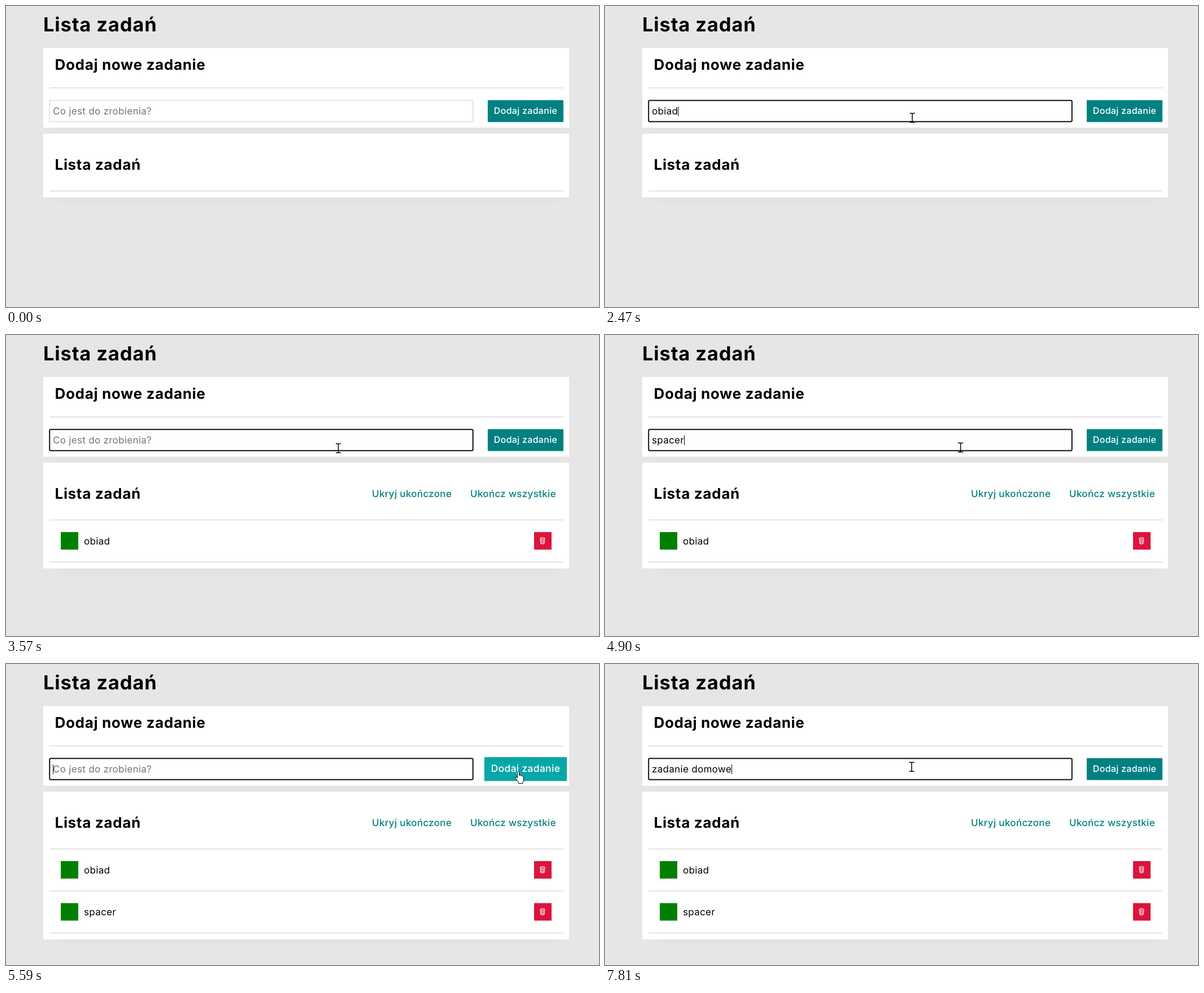
An HTML page that plays this animation: 1050x533 px, repeating every 8 s.

```html
<!DOCTYPE html>
<html lang="pl">
<head>
<meta charset="utf-8">
<title>Lista zadań</title>
<style>
  html, body { margin: 0; width: 100%; height: 100%; overflow: hidden; background: #e6e6e6; }
  svg { display: block; font: 500 17px Montserrat, Inter, sans-serif; }
  text { white-space: pre; text-rendering: geometricPrecision; letter-spacing: .018em; }
  .title, .heading { font-weight: 700; letter-spacing: .026em; }
  .title { font-size: 34.4px; }
  .heading { font-size: 26px; }
  .label { font-size: 16px; fill: #fff; text-anchor: middle; }
  .plain { font-weight: 400; }
  .card { fill: #fff; }
  .shadow { opacity: .02; filter: blur(7px); }
  .rule { fill: #e4e4e4; }
  .link { fill: teal; }
  .trash { fill: none; stroke: #fff; }
</style>
</head>
<body>
<svg width="1050" height="533" viewBox="0 0 1050 533">
  <defs>
    <g id="row">
      <rect x="97" y="349" width="31" height="31" fill="green"/>
      <rect x="935" y="349" width="31" height="31" fill="crimson"/>
      <g class="trash">
        <ellipse cx="950" cy="360" rx="4" ry="1.4"/>
        <path d="M946 360l.9 9.3q3.1 1.8 6.2 0l.9-9.3"/>
        <path stroke-width=".7" d="M948.5 362l.3 8M951.5 362l-.3 8M946.4 364h7.2M946.7 367h6.6"/>
      </g>
      <rect class="rule" x="77" y="401" width="910" height="2"/>
    </g>
  </defs>

  <text class="title" x="66" y="45">Lista zadań</text>
  <rect class="shadow" x="90" y="90" width="890" height="132"/>
  <rect class="shadow" id="listShadow" x="90" y="242" width="890"/>
  <rect class="card" x="66" y="74.5" width="931" height="141"/>
  <rect class="card" id="list" x="66" y="226" width="931"/>

  <text class="heading" x="86.5" y="113">Dodaj nowe zadanie</text>
  <rect class="rule" x="77" y="144" width="910" height="2"/>
  <rect id="field" x="77.2" y="167.2" width="749.6" height="37.6" fill="#fff"/>
  <text class="plain" id="entry" x="83" y="192"></text>
  <rect id="caret" y="178" width="1" height="17"/>
  <g id="button">
    <rect id="buttonBack" x="853" y="166.7" width="134" height="38.8"/>
    <text class="label" x="920" y="191">Dodaj zadanie</text>
  </g>

  <text class="heading" x="86.5" y="290">Lista zadań</text>
  <rect class="rule" x="77" y="326.5" width="910" height="2"/>
  <g id="first">
    <text class="link" x="648" y="287">Ukryj ukończone</text>
    <text class="link" x="822" y="287">Ukończ wszystkie</text>
    <use href="#row"/>
    <text class="plain" x="138" y="370.5">obiad</text>
  </g>
  <g id="second">
    <use href="#row" y="74.4"/>
    <text class="plain" x="138" y="445">spacer</text>
  </g>

  <g id="cursor" fill="#fff" stroke="#000" stroke-linejoin="round">
    <path id="arrow" d="M0 0v16l3.7-3.5 2.4 5.6 2.5-1-2.4-5.5h5.1z"/>
    <path id="beam" fill="none" stroke-width="1.5" d="M-4.5-8h3.5l1 1 1-1h3.5M0-7V7M-4.5 8h3.5l1-1 1 1h3.5"/>
    <path id="hand" d="M-1.6 1.5q1.6-2.6 3.2 0v6l1-.8q1.6-.4 2 1 1.8-.8 2.4.8 2.2-.4 2.4 1.8v5q0 2-1.6 3.8v2.4h-7.2v-2l-5.2-6.6q-1-2.4 1.4-2.4l1.6 1.4z"/>
  </g>
  <circle id="ring" r="12.3" fill="#8ed03a"/>
</svg>
<script>
const LOOP = 8000;
const $ = id => document.getElementById(id);
const clamp = v => Math.min(1, Math.max(0, v));
const ramp = (t, start, length) => clamp((t - start) / length);
const show = (id, on) => $(id).setAttribute('visibility', on ? 'visible' : 'hidden');
const set = (id, attrs) => {
  for (const key in attrs) $(id).setAttribute(key, attrs[key]);
};

// Each round: field gains focus, text is typed, button is pressed.
const rounds = [
  { focus: 800, blur: 2890, word: 'obiad', keys: [1460, 1660, 1730, 1860, 2210] },
  { focus: 3030, blur: 5450, word: 'spacer', keys: [3700, 3840, 3970, 4100, 4230, 4430] },
  { focus: 5590, blur: LOOP, word: 'zadanie domowe',
    keys: [6130, 6260, 6460, 6660, 6730, 6860, 6920, 7060, 7190, 7260, 7390, 7590, 7660, 7810] }
];
const hovers = [[2740, 3070], [5260, 5670]];
const clicks = [[735, 545, 198], [2930, 948, 177], [5450, 907, 190]];
const path = [
  [120, 806, 474], [450, 622, 352], [700, 545, 200.5], [2210, 545, 200.5],
  [2470, 543, 198], [2850, 948, 177], [3030, 948, 177], [3230, 604, 201], [3300, 588.5, 200.5],
  [4830, 588.5, 200.5], [5380, 907, 190], [5620, 907, 190], [5860, 543, 182], [LOOP, 543, 182]
];

function pointerAt(t) {
  const i = Math.max(1, path.findIndex(p => p[0] > t));
  const [a, b] = [path[i - 1], path[i]];
  const k = ramp(t, a[0], b[0] - a[0]);
  return [a[1] + (b[1] - a[1]) * k, a[2] + (b[2] - a[2]) * k];
}

function drawField(t) {
  const round = rounds.findLast(r => t >= r.focus) || rounds[0];
  const focused = t >= round.focus && t < round.blur;
  const pressed = round.keys.filter(k => k <= t);
  const text = round.word.slice(0, pressed.length);
  const entry = $('entry');
  entry.textContent = text || 'Co jest do zrobienia?';
  entry.setAttribute('fill', text ? '#000' : '#757575');
  set('field', focused
    ? { stroke: '#101010', 'stroke-width': 2, rx: 2 }
    : { stroke: '#d8d8d8', 'stroke-width': 1.3, rx: 0 });
  const lastInput = pressed.at(-1) || round.focus;
  show('caret', focused && (t - lastInput) % 1060 < 530);
  set('caret', { x: 83 + (text ? entry.getComputedTextLength() : 0) });
}

function drawButton(t) {
  const hover = Math.max(...hovers.map(([on, off]) => ramp(t, on, 180) - ramp(t, off, 150)));
  const shade = 128 + 39 * hover;
  set('button', { transform: `translate(920 186.1) scale(${1 + .09 * hover}) translate(-920 -186.1)` });
  set('buttonBack', { fill: `rgb(${8 * hover},${shade},${shade})` });
}

function drawList(t) {
  const count = rounds.slice(1).filter(r => t >= r.focus).length;
  const height = 113 + 74.4 * count;
  set('list', { height });
  set('listShadow', { height: height - 9 });
  show('first', count > 0);
  show('second', count > 1);
}

function drawPointer(t) {
  const [x, y] = pointerAt(t);
  const inRow = y > 166 && y < 206;
  const kind = inRow && x > 76 && x < 828 ? 'beam' : inRow && x > 852 ? 'hand' : 'arrow';
  set('cursor', { transform: `translate(${x} ${y})` });
  for (const id of ['arrow', 'beam', 'hand']) show(id, t >= 120 && id === kind);
  const click = clicks.find(c => t >= c[0] && t < c[0] + 140);
  show('ring', click);
  if (click) set('ring', { cx: click[1], cy: click[2], opacity: 1 - (t - click[0]) / 250 });
}

function draw(now) {
  const t = now % LOOP;
  drawField(t);
  drawButton(t);
  drawList(t);
  drawPointer(t);
  requestAnimationFrame(draw);
}
draw(0);
</script>
</body>
</html>
```
